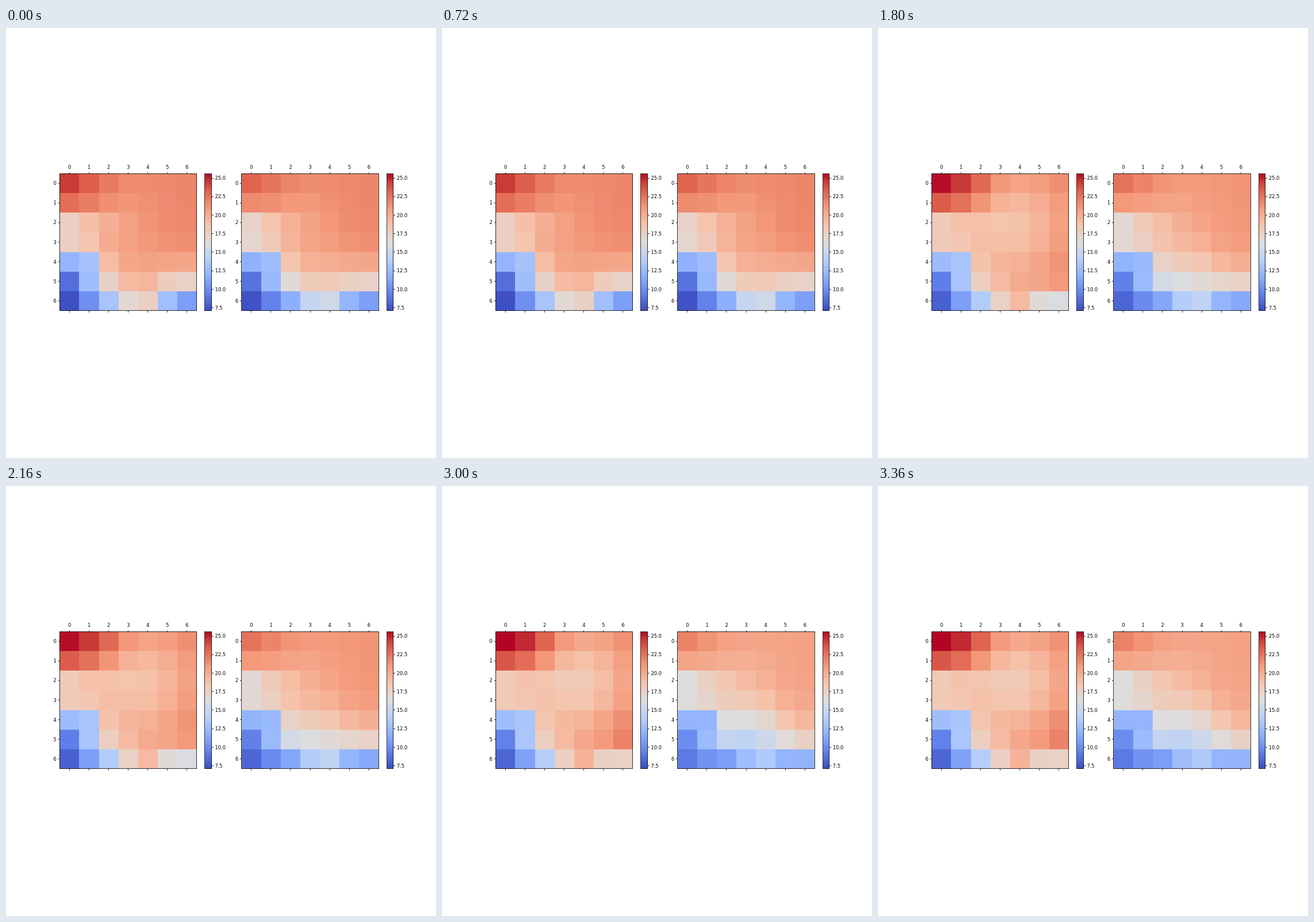
Recreate the animation shown at these times as an HTML page. Size 748 px wide and 748 px high, loop 3.6 s.

```html
<!DOCTYPE html>
<html lang="en">
<head>
<meta charset="utf-8">
<title>Two heat maps</title>
<style>
  html, body { margin: 0; width: 100%; height: 100%; overflow: hidden; background: #fff; }
  svg { display: block; width: 748px; height: 748px; }
  text { font: 8.33px "DejaVu Sans", sans-serif; fill: #000; }
  rect, line { shape-rendering: crispEdges; }
  line, .frame { stroke: #000; stroke-opacity: .8; stroke-width: 1; fill: none; }
</style>
</head>
<body>
<svg id="stage" viewBox="0 0 748 748"></svg>
<script>
const N = 7, TOP = 253.3, SIZE = 238.4, CELL = SIZE / N;
const LOW = 7.1, HIGH = 25.6, LOOP = 3600;
const STARTS = [0, 1200, 1800, 2400, 3000];

// Cool-to-warm colour stops: position, red, green, blue
const STOPS = [
  [0, 59, 76, 192], [.125, 98, 130, 234], [.25, 141, 176, 254],
  [.375, 184, 208, 249], [.5, 221, 221, 221], [.625, 245, 196, 173],
  [.75, 244, 154, 123], [.875, 222, 96, 77], [.9375, 203, 62, 56], [1, 180, 4, 38]
];

const clamp = t => Math.min(1, Math.max(0, t));
const mix = (a, b, t) => a + (b - a) * t;
const easeOut = t => Math.sin(clamp(t) * Math.PI / 2);
const smooth = t => { t = clamp(t); return t * t * (3 - 2 * t); };
const snap = v => Math.floor(v) + .5;

// Warm and cold patches: row, column, strength, spread
const TERRAIN = [[1.5, 2.7, -.9, 4], [4, 1, -3, .5], [4.6, 2, 2, 1], [6, 1.6, -2.2, .6]];

// west: first column; fall: cooling of the middle towards the last row
// drift and patches: change over the whole loop, paced by ease
const panels = [{
  x: 93.4,
  west: [24.6, 22.9, 17.8, 17.8, 12.5, 8.6, 7.3],
  fall: 4.3,
  drift: 1,
  patches: [[2, 4, -4, 8], [6, 6, 6, 3], [0, 1.5, 1.5, 2]],
  ease: t => smooth(t / .7)
}, {
  x: 409.8,
  west: [23.2, 21.7, 17.5, 17.2, 12.3, 8.8, 7.4],
  fall: 6.4,
  drift: -1.2,
  patches: [[6, 0, 3, 6], [4.7, 3, -3, 3], [6, 6, 2.5, 2]],
  ease: t => t
}];

function heat(patches, row, col) {
  return patches.reduce((sum, [r, c, strength, spread]) =>
    sum + strength * Math.exp(-((row - r) ** 2 + (col - c) ** 2) / spread), 0);
}

function temperature({ west, fall, drift, patches, ease }, row, col, time) {
  const depth = row / (N - 1);
  const middle = 21.9 - fall * depth ** 3;
  const east = 21.8 - 11 * depth ** 5;
  const base = col < 4
    ? mix(west[row], middle, easeOut(col / 4))
    : mix(middle, east, easeOut((col - 4) / 2));
  return base + heat(TERRAIN, row, col) + ease(time) * (drift + heat(patches, row, col));
}

function colour(value) {
  const p = clamp((value - LOW) / (HIGH - LOW));
  const i = Math.max(1, STOPS.findIndex(s => s[0] >= p));
  const a = STOPS[i - 1], b = STOPS[i];
  const t = (p - a[0]) / (b[0] - a[0]);
  return `rgb(${[1, 2, 3].map(c => Math.round(mix(a[c], b[c], t)))})`;
}

const stage = document.getElementById("stage");

function add(tag, attrs, parent = stage) {
  const el = document.createElementNS("http://www.w3.org/2000/svg", tag);
  for (const key in attrs) el.setAttribute(key, attrs[key]);
  parent.appendChild(el);
  return el;
}

function label(str, x, y, anchor) {
  add("text", { x, y: Math.round(y), "text-anchor": anchor }).textContent = str;
}

function box(x, width, attrs) {
  const left = snap(x), top = snap(TOP);
  add("rect", {
    x: left, y: top, width: snap(x + width) - left, height: snap(TOP + SIZE) - top, ...attrs
  });
}

const tick = (x1, y1, x2, y2) => add("line", { x1, y1, x2, y2 });

function buildPanel(panel) {
  const { x } = panel, bottom = snap(TOP + SIZE), top = snap(TOP), side = snap(x);
  const edge = (from, i) => Math.round(from + i * CELL);
  panel.cells = [];
  for (let row = 0; row < N; row++) {
    for (let col = 0; col < N; col++) {
      const cx = edge(x, col), cy = edge(TOP, row);
      panel.cells.push(add("rect", {
        x: cx, y: cy, width: edge(x, col + 1) - cx, height: edge(TOP, row + 1) - cy
      }));
    }
  }
  for (let i = 0; i < N; i++) {
    const mid = (i + .5) * CELL, tx = snap(x + mid), ty = snap(TOP + mid);
    tick(tx, top - 3, tx, top);
    tick(tx, bottom, tx, bottom + 3.5);
    tick(side - 3, ty, side, ty);
    label(i, x + mid + .2, 245, "middle");
    label(i, x - 5.5, TOP + mid + 3, "end");
  }
  box(x, SIZE, { class: "frame" });

  const barX = x + 252.3, barW = 11.7, barEnd = snap(barX + barW);
  box(barX, barW, { fill: "url(#scale)" });
  for (let v = 7.5; v <= 25; v += 2.5) {
    const y = TOP + (HIGH - v) / (HIGH - LOW) * SIZE;
    tick(barEnd, snap(y), barEnd + 3.5, snap(y));
    label(v.toFixed(1), barX + barW + 6, y + 3.2, "start");
  }
  box(barX, barW, { class: "frame" });
}

const scale = add("linearGradient", { id: "scale", x1: 0, y1: 1, x2: 0, y2: 0 });
for (const [offset, ...rgb] of STOPS) add("stop", { offset, "stop-color": `rgb(${rgb})` }, scale);
panels.forEach(buildPanel);

let shown = -1;
function show(step) {
  if (step === shown) return;
  shown = step;
  const time = step / (STARTS.length - 1);
  for (const panel of panels) {
    panel.cells.forEach((cell, n) => {
      const value = temperature(panel, Math.floor(n / N), n % N, time);
      cell.setAttribute("fill", colour(value));
    });
  }
}

const begin = performance.now();
function draw() {
  const time = (performance.now() - begin) % LOOP;
  show(STARTS.filter(s => s <= time).length - 1);
  requestAnimationFrame(draw);
}
draw();
</script>
</body>
</html>
```
